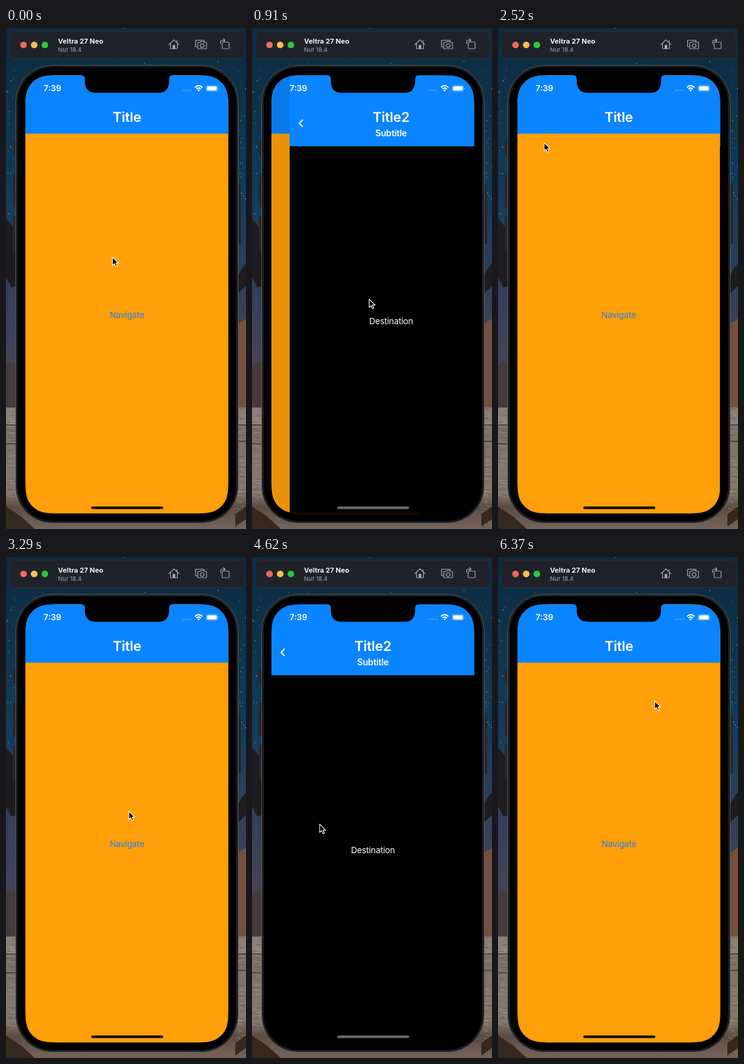
An HTML page that plays this animation: 383x800 px, repeating every 6440 ms.

```html
<!DOCTYPE html>
<html lang="en">
<head>
<meta charset="utf-8">
<title>Navigation demo</title>
<style>
html, body { margin: 0; width: 100%; height: 100%; overflow: hidden; background: #0b2a40; }
svg { display: block; width: 383px; height: 800px; font-family: Inter, Roboto, sans-serif; }
.mid { text-anchor: middle; fill: #fff; }
.head { font-size: 22px; font-weight: 600; letter-spacing: -.3px; }
.sub { font-size: 14px; font-weight: 600; letter-spacing: -.2px; }
.body { font-size: 13.6px; letter-spacing: -.2px; }
.line { fill: none; stroke: #a4a6aa; stroke-width: 1.2; stroke-linejoin: round; stroke-linecap: round; }
</style>
</head>
<body>
<svg viewBox="0 0 383 800">
  <defs>
    <linearGradient id="sky" x2="0" y2="1">
      <stop offset="0" stop-color="#0b2a40"/>
      <stop offset=".45" stop-color="#123c5a"/>
      <stop offset=".7" stop-color="#34405a"/>
      <stop offset=".86" stop-color="#454358"/>
      <stop offset="1" stop-color="#463d45"/>
    </linearGradient>
    <linearGradient id="wood" x2="0" y2="1">
      <stop offset="0" stop-color="#857c72"/>
      <stop offset=".14" stop-color="#8d847a"/>
      <stop offset=".17" stop-color="#7c7167"/>
      <stop offset=".7" stop-color="#86796c"/>
      <stop offset=".82" stop-color="#5c4c40"/>
      <stop offset="1" stop-color="#75645a"/>
    </linearGradient>
    <clipPath id="screen"><path id="outline"/></clipPath>
  </defs>

  <!-- Desktop -->
  <rect width="383" height="606" fill="url(#sky)"/>
  <g id="stars" fill="#a9c6d8"></g>
  <path d="M0 540 8 532 20 540V606H0Z" fill="#473a3e"/>
  <path d="M368 474 383 464V606H366Z" fill="#74503f"/>
  <path d="M0 304 10 316 20 340V412L8 414 0 398ZM366 404 376 384 383 376V412L366 428Z" fill="#1f1c20"/>
  <rect y="606" width="383" height="194" fill="url(#wood)"/>
  <g id="grain" stroke-linecap="round"></g>
  <path d="M0 634H383M0 664 383 660" stroke="#4b423c" stroke-width="2"/>
  <path d="M0 764 24 780 46 800H0ZM366 776 383 764V784L366 796Z" fill="#35281f"/>

  <!-- Simulator toolbar -->
  <rect x="6" y="5" width="374" height="44" rx="7" fill="#1f2229" stroke="#343840" stroke-width=".6"/>
  <circle cx="28" cy="27" r="5.3" fill="#ed6a5e"/>
  <circle cx="45" cy="27" r="5.3" fill="#f5bf4f"/>
  <circle cx="62" cy="27" r="5.3" fill="#2bc840"/>
  <text x="83" y="25" font-size="11" font-weight="700" fill="#f2f2f3">Veltra 27 Neo</text>
  <text x="83" y="37.5" font-size="9.6" fill="#a3a5a9">Nur 18.4</text>
  <g class="line">
    <path d="M260 26.500 268 19 276 26.500M262.500 25V33H273.500V25M273 20V23"/>
    <path d="M266.500 33V27.500H269.500V33Z" fill="#a4a6aa"/>
    <path d="M305 30H302.500V19.500H316V22M306 23H309.500L311 21.500H315L316.500 23H320V33H306Z"/>
    <circle cx="313" cy="28" r="3"/>
    <rect x="345" y="22.500" width="11" height="10.500" rx="1"/>
    <path d="M342.500 25V22Q342.500 19.500 345 19.500H349M347 17 349.500 19.500 347 22"/>
  </g>

  <!-- Phone body -->
  <path d="M13 178V202M13 232V286M13 300V354M373 250V345" stroke="#25282b" stroke-width="4"/>
  <rect x="15.500" y="59.500" width="355" height="731" rx="58" fill="#1b1b1c" stroke="#555759"/>
  <rect x="19" y="63" width="348" height="724" rx="55"/>

  <g clip-path="url(#screen)">
    <g id="root">
      <rect x="31" y="75" width="324" height="701" fill="#ff9f0a"/>
      <rect x="31" y="75" width="324" height="93.700" fill="#0a84ff"/>
      <text class="mid head" x="193" y="150">Title</text>
      <text class="mid body" id="link" x="193" y="463" style="fill:#2b80e3">Navigate</text>
    </g>
    <rect id="dim" x="31" y="75" width="324" height="701"/>
    <g id="detail">
      <rect x="31" y="75" width="324" height="701"/>
      <rect x="31" y="75" width="324" height="113.800" fill="#0a84ff"/>
      <path d="M51.500 147 46.500 152.200 51.500 157.400" fill="none" stroke="#fff" stroke-width="2" stroke-linecap="round" stroke-linejoin="round"/>
      <text class="mid head" x="193" y="150">Title2</text>
      <text class="mid sub" x="193" y="173">Subtitle</text>
      <text class="mid body" x="193" y="473">Destination</text>
    </g>
  </g>

  <!-- Notch and status bar -->
  <path d="M120 74V75.500Q125.700 75.500 125.700 81V85Q125.700 103.600 144 103.600H242Q260.300 103.600 260.300 85V81Q260.300 75.500 266 75.500V74Z"/>
  <text x="60" y="101" font-size="13.200" font-weight="600" fill="#fff">7:39</text>
  <path d="M283 99.500H296" stroke="#fff" stroke-opacity=".4" stroke-width="1.800" stroke-dasharray="1.800 1.900"/>
  <g fill="none" stroke="#fff" stroke-width="2">
    <path d="M301.500 95Q307.500 89 313.500 95M304 97.600Q307.500 94 311 97.600"/>
    <path d="M305.500 99 307.500 101.500 309.500 99Q307.500 97.500 305.500 99Z" fill="#fff" stroke="none"/>
  </g>
  <rect x="319.500" y="91.800" width="18" height="9.200" rx="2.600" fill="none" stroke="#fff" stroke-opacity=".5" stroke-width=".8"/>
  <rect x="320.700" y="93" width="15.600" height="6.800" rx="1.600" fill="#fff"/>
  <path d="M338.700 95V98.200Q340.300 96.600 338.700 95Z" fill="#fff" opacity=".6"/>
  <rect id="home" x="136" y="764" width="115" height="4.200" rx="2.100"/>

  <path id="cursor" d="M0 0V13L3 10.300 5.200 15 7.400 14 5.300 9.400H9.400Z" stroke="#fff" stroke-width="1.100" stroke-linejoin="round"/>
</svg>
<script>
const LOOP = 6440, STEP = 70, WIDTH = 324;
const PUSH_1 = 686, POP_1 = 2090, PUSH_2 = 3896, SWIPE = 5150, RELEASE = 5630;
const SWIPE_ORIGIN = 78;
const $ = id => document.getElementById(id);
const clamp = v => Math.max(0, Math.min(1, v));

// Pointer stops: time, x, y
const stops = [
  [0, 170, 366], [480, 186, 456], [PUSH_1, 186, 457], [910, 187, 433],
  [1100, 180, 405], [1820, 56, 151], [2300, 56, 151], [3290, 196, 406],
  [3680, 193, 456], [PUSH_2, 193, 456], [4060, 192, 446], [4300, 185, 430],
  [4900, 45, 424], [SWIPE, 45, 424], [RELEASE, 301, 416], [5800, 301, 410],
  [6370, 250, 230], [LOOP, 250, 230]
];

function pointerAt(t) {
  const i = stops.findIndex(stop => stop[0] > t);
  const [t0, x0, y0] = stops[i - 1], [t1, x1, y1] = stops[i];
  const u = (t - t0) / (t1 - t0), k = u * u * (3 - 2 * u);
  return [x0 + (x1 - x0) * k, y0 + (y1 - y0) * k];
}

// Critically damped spring from 0 to 1, settled once it is below a pixel
function spring(ms) {
  const s = Math.max(0, ms) * 0.018;
  return s > 8 ? 1 : 1 - (1 + s) * Math.exp(-s);
}

const dragged = x => 1 - clamp((x - SWIPE_ORIGIN) / WIDTH);

// 0 shows the root page, 1 the detail page
function progressAt(t) {
  if (t < POP_1) return spring(t - PUSH_1);
  if (t < PUSH_2) return 1 - spring(t - POP_1);
  if (t < SWIPE) return spring(t - PUSH_2);
  if (t < RELEASE) return dragged(pointerAt(t)[0]);
  return dragged(301) * (1 - spring(t - RELEASE));
}

function linkOpacity(t) {
  const since = t - (t < 3000 ? PUSH_1 : PUSH_2);
  if (since < -80) return 1;
  return since < 0 ? 0.2 : 0.2 + 0.8 * clamp(since / 400);
}

function draw(t) {
  const p = progressAt(t);
  $("root").setAttribute("transform", `translate(${-0.3 * WIDTH * p})`);
  $("root").setAttribute("visibility", p < 1 ? "visible" : "hidden");
  $("detail").setAttribute("transform", `translate(${Math.round(WIDTH * (1 - p))})`);
  $("dim").setAttribute("opacity", 0.09 * p);
  $("link").setAttribute("opacity", linkOpacity(t));
  $("home").setAttribute("fill", p > 0.5 ? "#686868" : "#141008");
  $("cursor").setAttribute("transform", `translate(${pointerAt(t)})`);
}

// Rounded rectangle whose corners ease into the straight sides
function smoothRect(left, top, right, bottom, r) {
  const corner = (x, y, dx, dy) => {
    const at = (a, b) => `${x + dx * a * r} ${y + dy * b * r}`;
    const points = [[0, 1.53], [0, 1.09], [0, 0.87], [0.075, 0.63],
      [0.17, 0.37], [0.37, 0.17], [0.63, 0.075], [0.87, 0], [1.09, 0], [1.53, 0]];
    if (dx * dy < 0) points.reverse();
    const [first, ...rest] = points.map(([a, b]) => at(a, b));
    return `${first}C${rest.join(" ")}`;
  };
  return `M${corner(left, top, 1, 1)}L${corner(right, top, -1, 1)}` +
    `L${corner(right, bottom, -1, -1)}L${corner(left, bottom, 1, -1)}Z`;
}
$("outline").setAttribute("d", smoothRect(31, 75.5, 354.8, 775.2, 39));

let seed = 7;
const random = () => (seed = seed * 16807 % 2147483647) / 2147483647;
function add(parent, tag, attributes) {
  const node = document.createElementNS("http://www.w3.org/2000/svg", tag);
  for (const name in attributes) node.setAttribute(name, attributes[name]);
  $(parent).append(node);
}
for (let i = 0; i < 90; i++) {
  const edge = i % 3;
  add("stars", "circle", {
    cx: edge ? (edge === 1 ? 0 : 370) + random() * 14 : random() * 383,
    cy: edge ? 50 + random() * 250 : random() * 62,
    r: 0.3 + random() * 0.4
  });
}
for (let i = 0; i < 110; i++) {
  const x = i % 2 ? 366 + random() * 8 : random() * 8, y = 608 + random() * 190;
  add("grain", "path", {
    d: `M${x} ${y}l${4 + random() * 8} ${random() * 2 - 1}`,
    stroke: random() < 0.5 ? "#51473f" : "#a99d90",
    opacity: 0.5
  });
}

const start = performance.now();
function frame() {
  const t = (performance.now() - start) % LOOP;
  draw(Math.floor(t / STEP) * STEP);
  requestAnimationFrame(frame);
}
frame();
</script>
</body>
</html>
```
